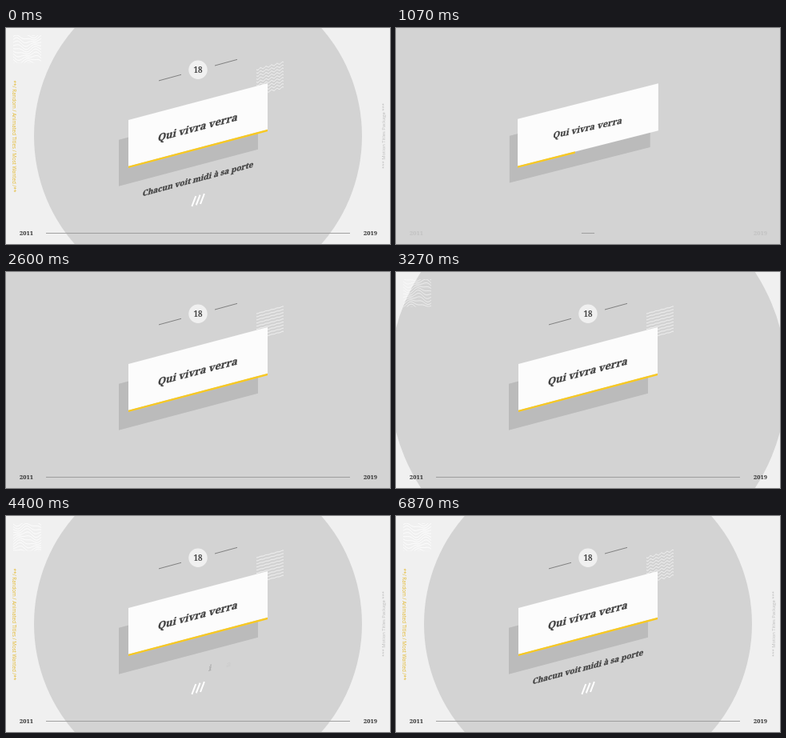
Recreate the animation shown at these times as an HTML page with a canvas. Size 480 by 270 pixels, loop 6940 ms.

```html
<!DOCTYPE html>
<html lang="fr">
<head>
<meta charset="utf-8">
<title>Qui vivra verra</title>
<style>
html, body { margin: 0; width: 100%; height: 100%; overflow: hidden; background: #d3d3d3; }
canvas { display: block; width: 480px; height: 270px; }
</style>
</head>
<body>
<canvas id="stage"></canvas>
<script>
const LOOP = 6940, POSTER = 70, SLOPE = 0.264;
const SERIF = '"Noto Serif", "DejaVu Serif", serif';
const SANS = '"Open Sans", "Noto Sans", sans-serif';
const INK = '#414141', YELLOW = '#f8c922', GREY = '#d3d3d3', PALE = '#f0f0f0';

const canvas = document.getElementById('stage');
const ctx = canvas.getContext('2d');
const dpr = window.devicePixelRatio || 1;
canvas.width = 480 * dpr;
canvas.height = 270 * dpr;

const inOut = p => p < 0.5 ? 4 * p ** 3 : 1 - 4 * (1 - p) ** 3;
const out = p => 1 - (1 - p) ** 3;
const mix = (a, b, p) => a + (b - a) * p;
const span = (t, from, to, ease = inOut) => ease(Math.min(1, Math.max(0, (t - from) / (to - from))));
const noise = n => { const v = Math.sin(n * 91.7 + 4.1) * 4375.5; return v - Math.floor(v); };

function scoped(draw) { ctx.save(); draw(); ctx.restore(); }

function line(x1, y1, x2, y2, color, width = 1) {
  ctx.strokeStyle = color;
  ctx.lineWidth = width;
  ctx.beginPath();
  ctx.moveTo(x1, y1);
  ctx.lineTo(x2, y2);
  ctx.stroke();
}

function disc(x, y, r, color) {
  ctx.fillStyle = color;
  ctx.beginPath();
  ctx.arc(x, y, r, 0, Math.PI * 2);
  ctx.fill();
}

// Parallelogram with upright sides, centred on x, y
function slab(x, y, halfW, h, slope, color) {
  const d = halfW * slope;
  ctx.fillStyle = color;
  ctx.beginPath();
  ctx.moveTo(x - halfW, y - h / 2 + d);
  ctx.lineTo(x + halfW, y - h / 2 - d);
  ctx.lineTo(x + halfW, y + h / 2 - d);
  ctx.lineTo(x - halfW, y + h / 2 + d);
  ctx.fill();
}

function label(str, x, y, font, align, color = INK) {
  ctx.font = font;
  ctx.textAlign = align;
  ctx.fillStyle = color;
  ctx.fillText(str, x, y);
}

function heavy(str, x, y) {
  ctx.fillText(str, x, y);
  ctx.lineWidth = 0.3;
  ctx.strokeStyle = INK;
  ctx.strokeText(str, x, y);
}

function curve(x0, x1, yAt) {
  ctx.beginPath();
  for (let x = x0; x <= x1; x += 0.5) ctx.lineTo(x, yAt(x));
  ctx.stroke();
}

function backdrop(t) {
  const p = span(t, 2560, 4100);
  ctx.fillStyle = p > 0 ? PALE : GREY;
  ctx.fillRect(0, 0, 480, 270);
  disc(240, 135, mix(277, 205, p), GREY);
}

function contours(t) {
  const show = span(t, 2900, 3550);
  if (!show) return;
  scoped(() => {
    ctx.globalAlpha = show;
    ctx.beginPath();
    ctx.rect(9, 9, 35, 34.5);
    ctx.clip();
    ctx.strokeStyle = '#fff';
    ctx.lineWidth = 0.9;
    const drift = t / 900;
    for (let i = -2; i < 13; i++) {
      const base = 9 + i * 3.5;
      curve(9, 44, x => base
        + 2.4 * Math.sin(x * 0.2 + i * 0.35 + drift)
        + 1.4 * Math.sin(x * 0.37 - i * 0.6 - drift * 0.7));
    }
  });
}

function ripples(t) {
  const amp = mix(0.25, 0.95, span(t, 4700, 5700));
  ctx.strokeStyle = '#f8f8f8';
  ctx.lineWidth = 0.9;
  for (let i = 0; i < 9; i++) {
    const reach = 17 * span(t, 1030 + i * 60, 1600 + i * 60);
    if (reach < 0.3) continue;
    curve(330 - reach, 330 + reach, x =>
      47.5 + i * 3.9 - (x - 330) * SLOPE + amp * Math.sin((x - 313) * 0.92));
  }
}

function panel(t) {
  const open = span(t, 150, 900, out);
  if (!open) return;
  const settle = span(t, 900, 1470);
  const slope = mix(0.252, SLOPE, settle);
  const half = mix(88, 87, settle) * open;
  const h = mix(59, 58, settle);
  const drop = span(t, 700, 1500, out);
  slab(240 - 12 * drop, 121 + 24.7 * drop, half, h, slope, '#bbb');
  slab(240, 121, half, h, slope, '#fcfcfc');

  const rule = span(t, 800, 1380) * half;
  if (rule) slab(240 - half + rule, 121 + h / 2 + 0.9 + (half - rule) * slope, rule, 2.4, slope, YELLOW);
}

function title(t) {
  const show = span(t, 500, 900);
  if (!show) return;
  const grow = span(t, 700, 1620);
  const s = mix(0.82, 1, grow);
  const slope = mix(0.2, SLOPE, grow);
  const draw = dx => heavy('Qui vivra verra', dx, 0);
  scoped(() => {
    ctx.globalAlpha = show;
    ctx.transform(s, -slope * s, -0.2 * s, s, 239, 128.6);
    ctx.font = '700 12.8px ' + SERIF;
    ctx.textAlign = 'center';
    ctx.fillStyle = INK;
    if (t < 3660 || t > 3860) return draw(0);
    // Brief sliced shift across the last word
    const bands = [[-60, -14, 74, 24, 0], [14, -14, 60, 10, 2], [14, -4, 60, 14, -1]];
    for (const [x, y, w, bh, dx] of bands) scoped(() => {
      ctx.beginPath();
      ctx.rect(x, y, w, bh);
      ctx.clip();
      draw(dx);
    });
  });
}

function subtitle(t) {
  if (t < 4360) return;
  const str = 'Chacun voit midi à sa porte';
  const gap = mix(0.52, 0, span(t, 5850, 6720));
  scoped(() => {
    ctx.transform(1, -SLOPE, -0.2, 1, 239.5, 192);
    ctx.font = '700 10px ' + SERIF;
    ctx.textAlign = 'left';
    ctx.fillStyle = INK;
    const left = -(ctx.measureText(str).width + gap * (str.length - 1)) / 2;
    [...str].forEach((ch, i) => {
      const start = 4360 + noise(i) * 400;
      const p = span(t, start, start + 360, out);
      if (!p) return;
      ctx.globalAlpha = p;
      const x = left + ctx.measureText(str.slice(0, i)).width + gap * i;
      heavy(ch, x, 7 * (1 - p));
    });
  });
}

function badge(t) {
  const s = span(t, 1350, 1900);
  if (s) scoped(() => {
    ctx.translate(240, 52.3);
    ctx.scale(s, s);
    disc(0, 0, 11.7, PALE);
    label('18', 0, 3.5, '700 9.8px ' + SERIF, 'center');
  });
  const p = span(t, 1560, 2150);
  if (!p) return;
  line(219, 58.3, 219 - 28 * p, 58.3 + 7.6 * p, '#777', 0.9);
  line(261, 47, 261 + 28 * p, 47 - 7.6 * p, '#777', 0.9);
}

function footer(t) {
  const reach = 190 * span(t, 864, 1805);
  if (reach) line(240 - reach, 256.5, 240 + reach, 256.5, '#999', 0.9);
  scoped(() => {
    ctx.globalAlpha = mix(0.1, 1, span(t, 1530, 2260));
    const font = '700 7.6px ' + SERIF;
    label('2011', 17, 259, font, 'left', '#2e2e2e');
    label('2019', 464, 259, font, 'right', '#2e2e2e');
  });
}

function sideText(t, str, x, y, turn, size, color) {
  const p = span(t, 3740, 4330, out);
  if (!p) return;
  scoped(() => {
    ctx.globalAlpha = p;
    ctx.translate(x - turn * 6 * (1 - p), y);
    ctx.rotate(turn * Math.PI / 2);
    label(str, 0, size * 0.33, size + 'px ' + SANS, 'center', color);
  });
}

function slashes(t) {
  for (let i = 0; i < 3; i++) {
    const p = span(t, 3520 + i * 35, 4220 + i * 35);
    if (!p) continue;
    const x = 237.3 + i * 5.3, y = 210 - i * 1.4;
    line(x, y, x - 4.9 * p, y + 12.8 * p, '#fff', 2);
  }
}

function render(t) {
  ctx.setTransform(dpr, 0, 0, dpr, 0, 0);
  backdrop(t);
  contours(t);
  ripples(t);
  panel(t);
  title(t);
  subtitle(t);
  badge(t);
  footer(t);
  slashes(t);
  sideText(t, '**/ Random / Animated Titles / Most Wanted /**', 10, 135.5, 1, 6.2, '#e3b92f');
  sideText(t, '*** Motion Titles Package ***', 472, 135, -1, 5.9, '#bdbdbd');
}

const begin = performance.now();
function tick() {
  const t = (performance.now() - begin) % LOOP;
  render(t < POSTER ? LOOP : t);   // the loop opens on the finished card
  requestAnimationFrame(tick);
}
tick();
</script>
</body>
</html>
```
